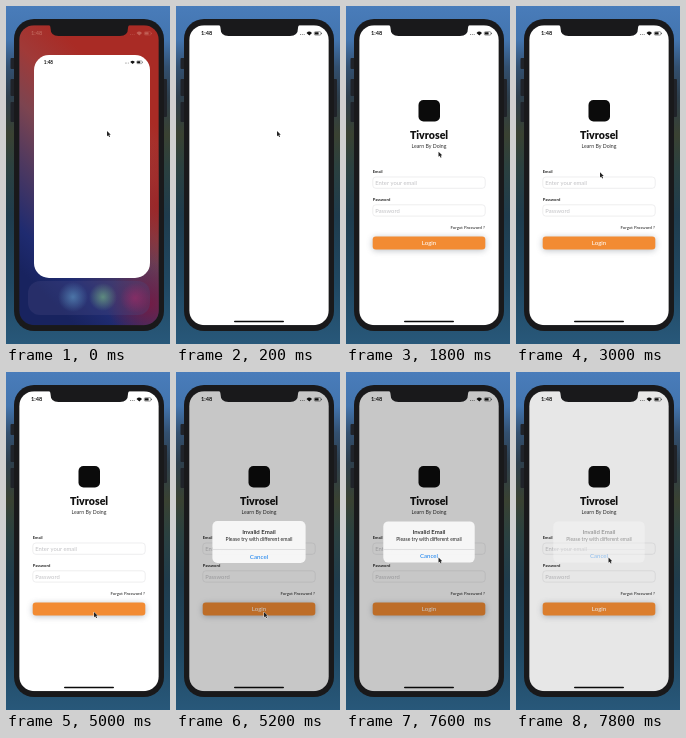
Recreate the animation shown at these times as an HTML page with a canvas. Size 164 px wide and 338 px high, loop 8 s.

```html
<!DOCTYPE html>
<html lang="en">
<head>
<meta charset="utf-8">
<title>Login demo</title>
<style>
html, body { margin: 0; width: 100%; height: 100%; overflow: hidden; background: #1f4866; }
canvas { display: block; width: 164px; height: 338px; }
</style>
</head>
<body>
<canvas id="stage"></canvas>
<script>
const W = 164, H = 338, LOOP = 8000, STEP = 200;
const SCREEN = [13.2, 19.2, 139.6, 300];
const canvas = document.getElementById('stage');
const ratio = window.devicePixelRatio || 1;
canvas.width = W * ratio;
canvas.height = H * ratio;
const ctx = canvas.getContext('2d');
ctx.scale(ratio, ratio);

const clamp = v => Math.max(0, Math.min(1, v));
const progress = (t, from, to) => clamp((t - from) / (to - from));
const ease = p => p * p * (3 - 2 * p);

function roundPath(x, y, w, h, r) {
  ctx.beginPath();
  ctx.roundRect(x, y, w, h, r);
}

function box(x, y, w, h, r, fill) {
  roundPath(x, y, w, h, r);
  ctx.fillStyle = fill;
  ctx.fill();
}

function outline(x, y, w, h, r, color, width) {
  roundPath(x, y, w, h, r);
  ctx.strokeStyle = color;
  ctx.lineWidth = width;
  ctx.stroke();
}

function text(str, x, y, size, color, weight = 400, align = 'left') {
  ctx.font = `${weight} ${size}px Lato, sans-serif`;
  ctx.textAlign = align;
  ctx.textBaseline = 'alphabetic';
  ctx.fillStyle = color;
  ctx.fillText(str, x, y);
}

function linear(x0, y0, x1, y1, stops) {
  const g = ctx.createLinearGradient(x0, y0, x1, y1);
  stops.forEach(([at, color]) => g.addColorStop(at, color));
  return g;
}

function glow(x, y, r, rgb, alpha) {
  const g = ctx.createRadialGradient(x, y, 0, x, y, r);
  g.addColorStop(0, `rgba(${rgb},${alpha})`);
  g.addColorStop(1, `rgba(${rgb},0)`);
  ctx.fillStyle = g;
  ctx.fillRect(x - r, y - r, 2 * r, 2 * r);
}

function fillScreen(fill) {
  ctx.fillStyle = fill;
  ctx.fillRect(...SCREEN);
}

function wallpaper() {
  ctx.fillStyle = linear(0, 0, 0, H, [
    [0, '#497cba'], [0.1, '#4375af'], [0.18, '#335070'], [0.27, '#2e3f4c'],
    [0.38, '#3a4232'], [0.48, '#2b4140'], [0.62, '#1f3c4d'], [0.82, '#204862'], [1, '#28587a']
  ]);
  ctx.fillRect(0, 0, W, H);
}

function phoneBody() {
  for (const [x, y, h] of [[4.5, 52, 11], [4.5, 73, 17], [4.5, 96, 20], [157, 73, 38]])
    box(x, y, 4, h, 1, '#202329');
  box(8, 13, 150, 312, 20, '#19191b');
}

function notch() {
  ctx.fillStyle = '#19191b';
  ctx.beginPath();
  ctx.moveTo(41.5, 18);
  ctx.quadraticCurveTo(44.5, 19, 44.5, 22);
  ctx.quadraticCurveTo(44.5, 30, 52.5, 30);
  ctx.lineTo(114, 30);
  ctx.quadraticCurveTo(122, 30, 122, 22);
  ctx.quadraticCurveTo(122, 19, 125, 18);
  ctx.fill();
}

function statusBar(color) {
  text('1:48', 25, 29.2, 5.6, color, 700);
  ctx.fillStyle = color;
  for (let i = 0; i < 3; i++) ctx.fillRect(124 + i * 1.9, 28, 0.7, 0.7);
  ctx.beginPath();
  ctx.moveTo(133.3, 29.5);
  ctx.arc(133.3, 29.5, 3.7, -Math.PI * 0.77, -Math.PI * 0.23);
  ctx.fill();
  outline(138.3, 25.7, 6.6, 3.4, 1, color, 0.4);
  box(138.8, 26.2, 3.8, 2.4, 0.5, color);
  box(145.4, 26.7, 0.6, 1.4, 0.3, color);
}

function homeScreen() {
  fillScreen(linear(150, 120, 10, 260, [
    [0, '#a92b25'], [0.2, '#a03a38'], [0.4, '#7c4450'],
    [0.6, '#50395f'], [0.85, '#1f2b70'], [1, '#18235f']
  ]));
  glow(155, 200, 65, '160,28,28', 0.7);
  glow(143, 298, 42, '125,22,62', 0.8);
  box(22, 275, 122, 34, 12, 'rgba(75,75,130,.3)');
  glow(67, 291, 15, '90,145,190', 0.7);
  glow(97, 291, 14, '105,160,130', 0.8);
  glow(129, 292, 15, '160,45,105', 0.6);
  statusBar('rgba(220,150,135,.5)');
}

function launchCard() {
  box(28, 49, 116, 223, 15, '#fff');
  ctx.save();
  ctx.translate(17.3, 33.8);
  ctx.scale(0.82, 0.82);
  statusBar('#111');
  ctx.restore();
}

function field(label, hint, y) {
  text(label, 26.7, y - 4.2, 4.1, '#222', 700);
  outline(26.8, y, 112.4, 11.3, 3, '#e7e7e8', 0.7);
  text(hint, 29.3, y + 7.8, 5.8, '#c2c2c5');
}

function loginPage(pressed) {
  box(72.5, 94, 21.5, 21.5, 5, '#0b0b0b');
  text('Tivrosel', 83, 132.7, 10.6, '#111', 900, 'center');
  text('Learn By Doing', 83, 141.5, 5.2, '#333', 400, 'center');
  field('Email', 'Enter your email', 171);
  field('Password', 'Password', 198.8);
  text('Forgot Password ?', 139, 223, 4.3, '#222', 400, 'right');

  ctx.save();
  ctx.shadowColor = 'rgba(90,100,115,.42)';
  ctx.shadowBlur = 6 * ratio;
  ctx.shadowOffsetY = ratio;
  box(26.7, 230.6, 112.6, 13, 3, '#f28b33');
  ctx.restore();
  if (!pressed) text('Login', 83, 239.4, 6.2, '#fff', 400, 'center');
}

function alertBox(alpha, zoom) {
  ctx.save();
  ctx.globalAlpha = alpha;
  ctx.translate(83, 170);
  ctx.scale(zoom, zoom);
  ctx.translate(-83, -170);
  box(37.3, 149.4, 91.4, 41.2, 5, 'rgba(248,248,248,.96)');
  text('Invalid Email', 83, 162.2, 6, '#111', 500, 'center');
  text('Please try with different email', 83, 169, 5, '#222', 400, 'center');
  ctx.fillStyle = '#d0d0d2';
  ctx.fillRect(37.3, 177, 91.4, 0.6);
  text('Cancel', 83, 186.3, 6.1, '#1680ee', 400, 'center');
  ctx.restore();
}

// Pointer stops: [time, x, y], eased from one to the next.
const stops = [[1200, 101, 125], [2400, 84, 166.3], [3400, 84, 166.3],
  [4600, 88, 240], [6000, 88, 240], [6800, 92.5, 185.5]];

function pointerAt(t) {
  const next = stops.findIndex(([time]) => t <= time);
  if (next === 0) return stops[0].slice(1);
  if (next < 0) return stops[stops.length - 1].slice(1);
  const [t0, x0, y0] = stops[next - 1], [t1, x1, y1] = stops[next];
  const p = ease(progress(t, t0, t1));
  return [x0 + (x1 - x0) * p, y0 + (y1 - y0) * p];
}

function pointer(x, y) {
  ctx.save();
  ctx.translate(x, y);
  ctx.scale(0.9, 0.9);
  ctx.beginPath();
  [[0, 0], [0, 5.8], [1.4, 4.6], [2.4, 6.8], [3.4, 6.3], [2.4, 4.2], [4.2, 4.1]]
    .forEach(([px, py]) => ctx.lineTo(px, py));
  ctx.closePath();
  ctx.strokeStyle = '#fff';
  ctx.lineWidth = 0.9;
  ctx.stroke();
  ctx.fillStyle = '#222';
  ctx.fill();
  ctx.restore();
}

function draw(t) {
  wallpaper();
  phoneBody();
  ctx.save();
  roundPath(...SCREEN, 15);
  ctx.clip();
  if (t < 200) {
    homeScreen();
    launchCard();
  } else {
    fillScreen('#fff');
    statusBar('#111');
    if (t >= 1400) loginPage(t >= 5000 && t < 5200);
    box(58, 314.7, 50, 1.6, 0.8, '#0a0a0a');
    if (t >= 5200) {
      const shown = 1 - progress(t, 7600, 7950);
      fillScreen(`rgba(0,0,0,${0.22 * shown})`);
      alertBox(shown, 1 + 0.02 * (1 - progress(t, 5200, 5400)));
    }
  }
  ctx.restore();
  notch();
  pointer(...pointerAt(t));
}

function frame() {
  const t = performance.now() % LOOP;
  draw(Math.floor(t / STEP) * STEP);
  requestAnimationFrame(frame);
}
frame();
</script>
</body>
</html>
```
